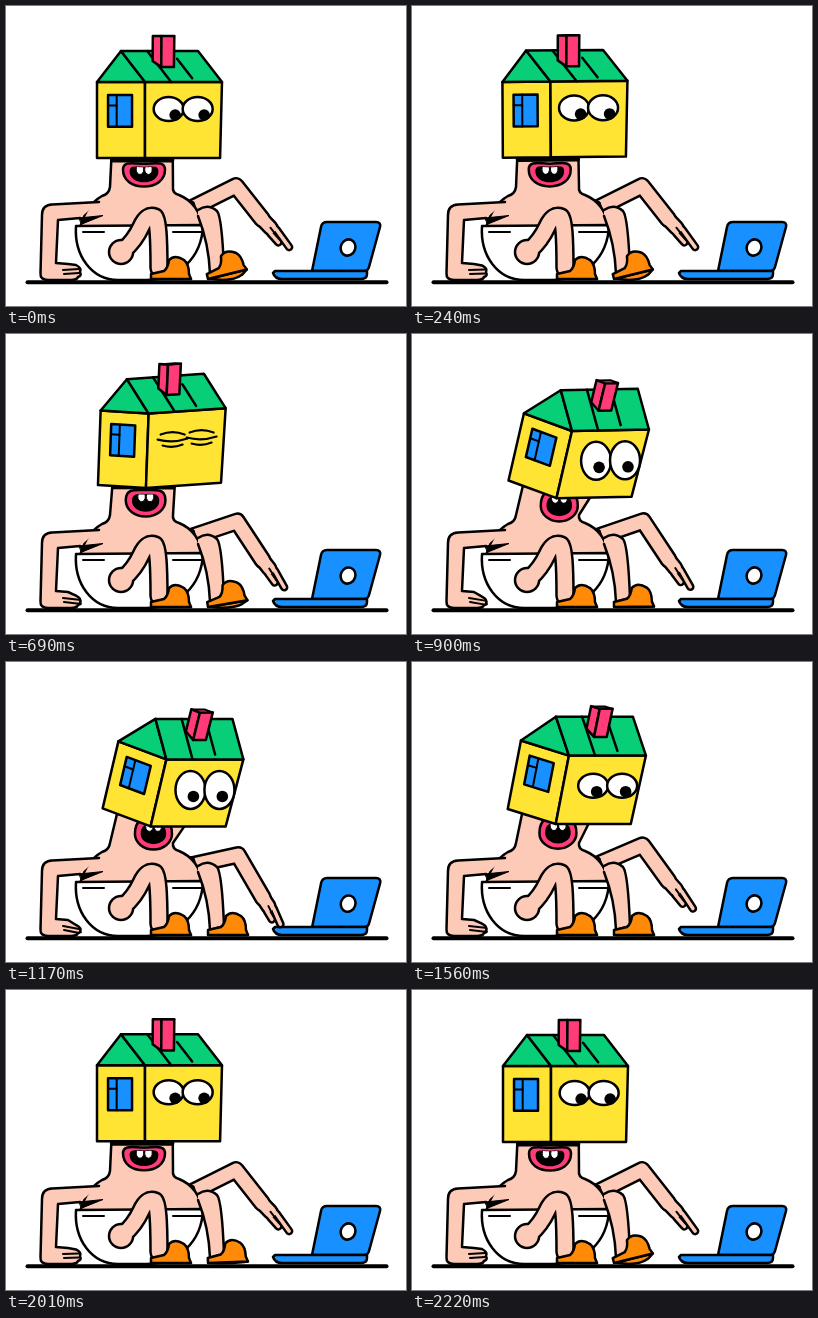
Recreate the animation shown at these times as an HTML page with a canvas. Size 400x300 px, loop 2250 ms.

```html
<!DOCTYPE html>
<html lang="en">
<head>
<meta charset="utf-8">
<title>House head at a laptop</title>
<style>
html, body { margin: 0; width: 100%; height: 100%; overflow: hidden; background: #fff; }
canvas { display: block; width: 400px; height: 300px; }
</style>
</head>
<body>
<canvas id="stage" width="400" height="300"></canvas>
<script>
const ctx = document.getElementById('stage').getContext('2d');
const LOOP = 2250;
const INK = '#000', SKIN = '#fdcab8', YELLOW = '#ffe433', GREEN = '#08cf77';
const PINK = '#ff3c78', BLUE = '#1890ff', ORANGE = '#ff8a08', WHITE = '#fff';

const clamp = k => Math.min(1, Math.max(0, k));
const mix = (a, b, k) => a + (b - a) * k;

// Eases from 0 to 1 between two times.
function ramp(t, from, to) {
  const k = clamp((t - from) / (to - from));
  return k * k * (3 - 2 * k);
}

// Rises to 1 at the peak and falls back to 0 within the reach.
function pulse(t, peak, reach) {
  return Math.cos(Math.PI / 2 * Math.min(1, Math.abs(t - peak) / reach)) ** 2;
}

function motion(t) {
  return {
    // lean back, swing forward, return
    roll: -.055 * ramp(t, 200, 400) + .28 * ramp(t, 540, 930) - .225 * ramp(t, 1500, 1740),
    hop: 15 * pulse(t, 585, 110) + 3.5 * pulse(t, 1800, 300),
    pitch: 6 * pulse(t, 600, 450),
    eye: (12 + 5 * ramp(t, 200, 420) + 2 * ramp(t, 750, 900) - 7 * ramp(t, 1440, 1560)) * (1 - pulse(t, 690, 100)),
    tap: ramp(t, 240, 360) - .6 * pulse(t, 800, 300) - ramp(t, 1320, 1680) + .2 * pulse(t, 1800, 200),
    fingers: Math.cos(2 * Math.PI * t / LOOP),
    leftFoot: pulse(t, 1800, 220),
    rightFoot: 1 - ramp(t, 540, 960) + ramp(t, 1950, 2190)
  };
}

function paint(path, fill, width = 2.5) {
  if (fill) {
    ctx.fillStyle = fill;
    ctx.fill(path);
  }
  if (width) {
    ctx.strokeStyle = INK;
    ctx.lineWidth = width;
    ctx.stroke(path);
  }
}

const shape = (d, fill, width) => paint(new Path2D(d), fill, width);
const trace = (...points) => 'M' + points.map(p => p.join(' ')).join('L');
const poly = (points, fill, width) => shape(trace(...points) + 'Z', fill, width);
const line = (a, b, width) => shape(trace(a, b), null, width);

function oval(x, y, rx, ry, fill, width) {
  const path = new Path2D();
  path.ellipse(x, y, rx, ry, 0, 0, Math.PI * 2);
  paint(path, fill, width);
}

// Strokes each part in ink first, then in skin, so that parts merge.
function limb(parts) {
  for (const [extra, color] of [[2.5, INK], [-2.5, SKIN]]) {
    ctx.strokeStyle = color;
    for (const [d, width] of parts) {
      ctx.lineWidth = width + extra;
      ctx.stroke(new Path2D(d));
    }
  }
}

function laptop(t) {
  const jolt = 2.2 * Math.exp(-((t + 1460) % 790) / 90) * (t > 330 && t < 1600 ? 1 : 0);
  ctx.save();
  ctx.translate(jolt, jolt);
  shape('M321 216H370Q375 216 374 221L363 261Q362 265 358 265H306L315 221Q316 216 321 216Z', BLUE);
  ctx.translate(342, 241.5);
  ctx.rotate(.35);
  oval(0, 0, 7.3, 8.2, WHITE);
  ctx.restore();
  shape('M269 265H361V268Q361 273 355 273H276Q269 273 267 267Z', BLUE);
}

function rightArm(tap) {
  const elbow = [mix(230, 232, tap), mix(180, 193, tap)];
  const wrist = [mix(256, 257, tap), mix(213, 236, tap)];
  const tip = [mix(284, 275, tap), mix(242, 263, tap)];
  const dx = tip[0] - wrist[0], dy = tip[1] - wrist[1], len = Math.hypot(dx, dy);
  const at = (along, side) => [
    wrist[0] + dx * along - dy / len * side,
    wrist[1] + dy * along + dx / len * side
  ];
  limb([
    [trace([182, 204], elbow, wrist), 15.5],
    [trace(wrist, at(.3, 0)), 14],
    [trace(at(.1, -3), at(.45, -3), at(.97, 0)), 6],
    [trace(at(.1, 2), at(.4, 4), at(.7, 4.5)), 6]
  ]);
  line(at(.3, 0), at(.68, 1.5), 2);
  shape('M179 193L188 196L191 206L184 203Z', INK, 1);
}

function torso(neckL, neckR, shade) {
  shape(`M${neckL}L104 181Q103 188 96 190Q80 199 74 222H197Q193 197 173 189Q166 187 167 181L${neckR}Z`, SKIN);
  if (shade > 0) line([neckL[0] + 1, neckL[1] + 2], [neckR[0] - 1, neckR[1] + 2], 5 * shade);
  shape('M70 220L197 219C196 252 172 274 140 274H112C86 274 68 250 70 220Z', WHITE);
  shape('M77 226H98M167 226H195', null, 2);
}

function leftArm(lift) {
  const y = 264 - 2 * lift;
  shape(`M93 196L46 198.5Q36 199 36 209L34.5 267Q34 274 42 274H65Q71 274 72 271Q76 270 74 ${y + 4}Q76 ${y} 70 ${y - 3}L62 258L50 257L52 214L74 212`, SKIN);
  shape('M73 212L97 209.5L76 218Z', INK, 1);
  shape(`M57 264L73 ${y + 1}M58 268L73 ${y + 5}`, null, 2);
}

function foot(x, lift) {
  ctx.save();
  ctx.translate(x, 273);
  ctx.rotate(-.24 * lift);
  shape(`M2 0Q22 ${9 * lift} 34 ${4 * lift}L40 0Z`, ORANGE);
  shape('M0 0V-5L13 -8Q17 -11 18 -19Q24 -25 33 -19Q38 -15 38 -5L40 0Z', ORANGE);
  ctx.restore();
}

function legs(left, right) {
  limb([
    ['M115 246H115.1', 24],
    ['M118 244Q129 234 135 221Q141 208 149 211Q153 215 153 262', 17]
  ]);
  shape('M192 204Q202 197 211 205Q216 211 218 264L204 268Q203 238 192 210', SKIN);
  foot(145, left);
  foot(202, right);
}

function mouth(x, y, round) {
  const rx = mix(21, 18.5, round), ry = mix(13, 15.5, round);
  const top = mix(-.75, -1, round), corner = mix(-.3, 0, round);
  const outline = (w, h) => new Path2D(
    `M${-w} ${corner * h}C${-w} ${-h} ${-.5 * w} ${top * h} 0 ${top * h}` +
    `C${.5 * w} ${top * h} ${w} ${-h} ${w} ${corner * h}` +
    `C${w} ${.55 * h} ${.55 * w} ${h} 0 ${h}C${-.55 * w} ${h} ${-w} ${.55 * h} ${-w} ${corner * h}Z`);
  ctx.save();
  ctx.translate(x, y);
  paint(outline(rx, ry), PINK);
  const inner = outline(rx * .65, ry * .62);
  paint(inner, INK, 1.5);
  ctx.clip(inner);
  for (const tooth of [-4, 4.5]) oval(tooth, top * ry * .62 + 2, 3.8, 5, WHITE, 1);
  ctx.restore();
}

function eyes(at, roll, open) {
  for (const side of [0, .38]) {
    const [x, y] = at(.31 + .45 * roll + side, .355 + .45 * roll);
    if (open < 4) {
      shape(`M${x - 12} ${y - 5}q12 -5 24 0M${x - 15} ${y}q15 4 30 -1M${x - 10} ${y + 6}q10 3 20 -1`, null, 2.2);
    } else {
      oval(x, y, 15, open, WHITE);
      oval(x + 6.5 - 16 * roll, y + Math.min(6.5, open / 2), 5.8, Math.min(5.8, open / 2), INK, 0);
    }
  }
}

function head({ roll, hop, pitch, eye }) {
  const corner = [139 + 95 * roll, 76 + 95 * roll - hop];
  const right = [77, -pitch], down = [-70 * roll, 76 - 40 * Math.abs(roll)];
  const left = [-48, -80 * roll], slope = [-24 + 58 * roll, -31 - 42 * roll - pitch / 3];
  // Walks from the front corner along the four edge directions.
  const at = (u, v, w = 0, s = 0) => corner.map((c, i) =>
    c + u * (1 - .025 * v) * right[i] + v * down[i] + w * left[i] + s * slope[i]);

  const round = clamp(roll * 12);
  torso(at(0, 1, .7), at(.37 + .35 * roll, 1), 1 - round);
  mouth(138 + 42 * roll, 167.5 + 20 * roll - hop / 3, round);

  poly([at(0, 0), at(0, 0, 1), at(0, 1, 1), at(0, 1)], YELLOW);
  poly([at(0, 0), at(1, 0), at(1, 1), at(0, 1)], YELLOW);
  poly([at(0, 0), at(0, 0, 1), at(0, 0, 0, 1)], GREEN);
  poly([at(0, 0), at(0, 0, 0, 1), at(1, 0, 0, 1), at(1, 0)], GREEN);
  line(at(.34, 0), at(.34, 0, 0, 1));
  line(at(.65, 0, 0, .12), at(.65, 0, 0, .75));

  const near = .36 + .25 * roll, far = near + .165, top = -.41, up = .48, cap = .16 * clamp(roll * 20);
  poly([at(near, top, 0, up), at(near, top, .18, up), at(near, -.08, .18, up), at(near, 0, 0, up)], PINK);
  poly([at(near, top, 0, up), at(far, top, 0, up), at(far, 0, 0, up), at(near, 0, 0, up)], PINK);
  poly([at(near, top, 0, up), at(near, top, cap, up), at(far, top, cap, up), at(far, top, 0, up)], PINK, 2);

  poly([at(0, .17, .77), at(0, .17, .27), at(0, .59, .27), at(0, .59, .77)], BLUE);
  line(at(0, .17, .59), at(0, .59, .59), 2);
  line(at(0, .31, .77), at(0, .31, .59), 2);

  eyes(at, roll, eye);
}

function draw() {
  const t = performance.now() % LOOP;
  const pose = motion(t);
  ctx.fillStyle = WHITE;
  ctx.fillRect(0, 0, 400, 300);
  ctx.lineJoin = ctx.lineCap = 'round';
  laptop(t);
  rightArm(pose.tap);
  head(pose);
  leftArm(pose.fingers);
  legs(pose.leftFoot, pose.rightFoot);
  shape('M21.5 276.3H380.5', null, 4);
  requestAnimationFrame(draw);
}
requestAnimationFrame(draw);
</script>
</body>
</html>
```
